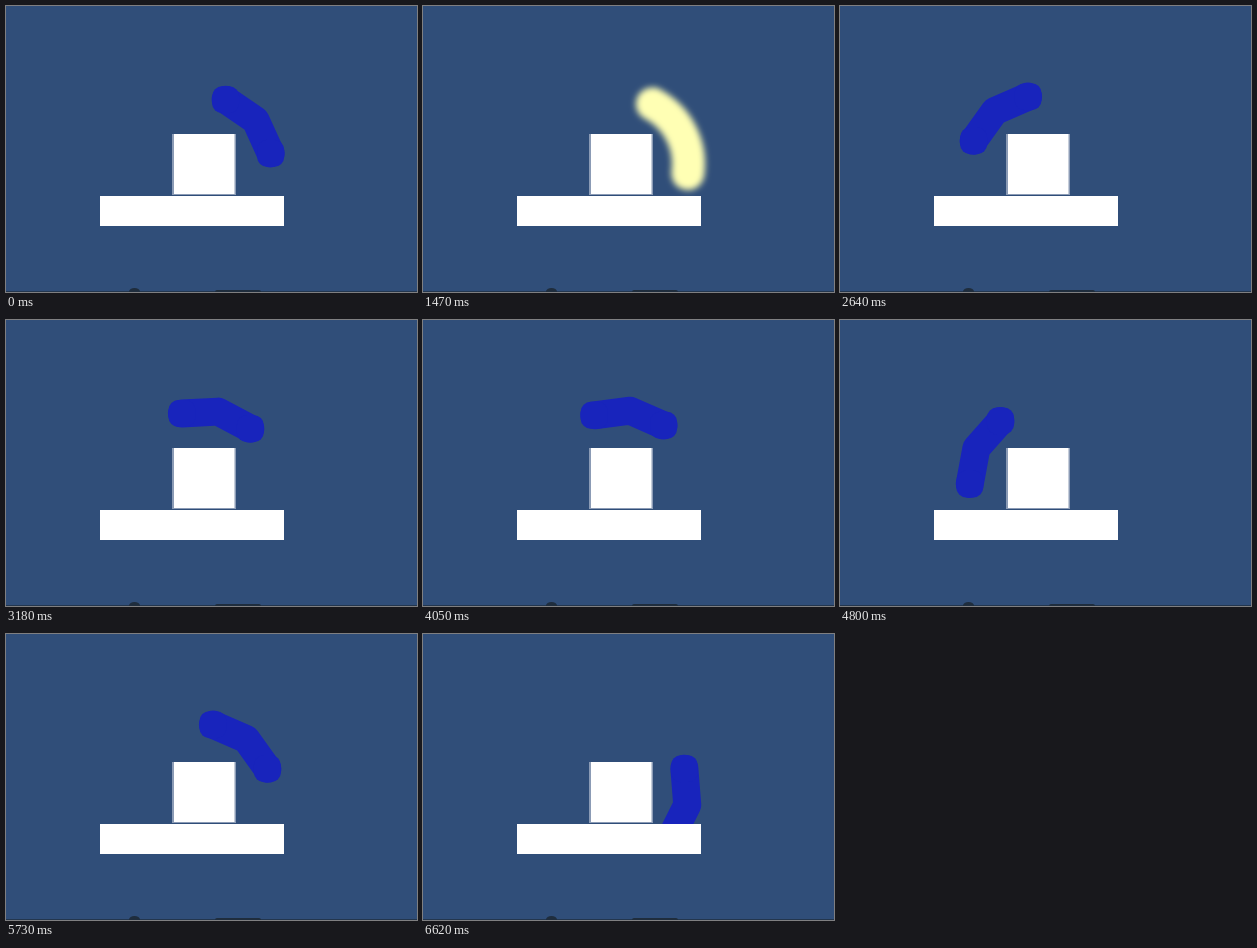
Recreate the animation shown at these times as an HTML page. Size 411 px wide and 286 px high, loop 6690 ms.

```html
<!DOCTYPE html>
<html lang="en">
<head>
<meta charset="utf-8">
<title>Swinging arc</title>
<style>
  html, body { margin: 0; width: 100%; height: 100%; overflow: hidden; background: #304e79; }
  svg { display: block; width: 100vw; height: 100vh; }
</style>
</head>
<body>
<svg viewBox="0 0 411 286">
  <defs>
    <filter id="soft" filterUnits="userSpaceOnUse" x="0" y="0" width="411" height="286">
      <feGaussianBlur stdDeviation="3"/>
    </filter>
  </defs>
  <rect width="411" height="286" fill="#304e79"/>
  <g id="arm" fill="#1824bc">
    <polyline id="bar" fill="none" stroke="#1824bc" stroke-width="28" stroke-linejoin="round" stroke-linecap="round"/>
    <rect id="tipA" width="27" height="27" rx="10"/>
    <rect id="tipB" width="27" height="27" rx="10"/>
  </g>
  <rect x="166" y="128" width="64" height="61" fill="#8b9bb5"/>
  <rect x="168" y="128" width="60.5" height="60" fill="#fff"/>
  <rect x="94" y="190" width="184" height="30" fill="#fff"/>
  <path id="glow" fill="none" stroke="#ffffb4" stroke-width="33" stroke-linecap="round" filter="url(#soft)"/>
  <g fill="#1f2d3d">
    <rect y="285" width="411" height="1" opacity=".7"/>
    <ellipse cx="128.5" cy="285.5" rx="5.5" ry="3.5"/>
    <rect x="209" y="284" width="46" height="4" rx="2"/>
  </g>
</svg>
<script>
const LOOP = 6690, CX = 197.5, CY = 158, R = 68;
const HALF = 31, GLOW_HALF = 35, START = -40;

const linear = x => x;
const easeOut = x => 1 - (1 - x) ** 1.7;
const easeIn = x => x ** 1.2;
const smooth = x => x * x * (3 - 2 * x);

// first change, last change, number of steps, final angle, easing
const moves = [
  [330, 600, 5, -27, easeOut],
  [2020, 2090, 2, -64.5, linear],
  [2160, 2640, 7, -129, easeOut],
  [2710, 3180, 8, -77.5, smooth],
  [4040, 4450, 7, -154, smooth],
  [5440, 5730, 5, -51, easeIn],
  [5800, 6000, 3, -16, easeOut],
  [6410, 6620, 4, 11, linear]
];
const flashes = [
  [1470, 1600], [1730, 1870], [3840, 3970],
  [4530, 4800], [4930, 5060], [6070, 6210]
];

const el = id => document.getElementById(id);
const arm = el('arm'), bar = el('bar'), glow = el('glow');
const tips = [el('tipA'), el('tipB')];

function point(deg) {
  const a = deg * Math.PI / 180;
  return [CX + R * Math.cos(a), CY + R * Math.sin(a)];
}

function angleAt(t) {
  let angle = START;
  for (const [from, to, count, target, ease] of moves) {
    if (t < from) break;
    const gap = (to - from) / (count - 1);
    const step = Math.min(count, Math.floor((t - from) / gap + 1e-6) + 1);
    angle += (target - angle) * ease(step / count);
  }
  return angle;
}

function draw(t) {
  const angle = angleAt(t);
  const lit = flashes.some(([on, off]) => t >= on && t < off);
  arm.style.display = lit ? 'none' : '';
  glow.style.display = lit ? '' : 'none';

  const pts = [-HALF, 0, HALF].map(d => point(angle + d));
  bar.setAttribute('points', pts.join(' '));
  [pts[0], pts[2]].forEach(([x, y], i) => {
    tips[i].setAttribute('x', x - 13.5);
    tips[i].setAttribute('y', y - 13.5);
  });
  glow.setAttribute('d',
    `M${point(angle - GLOW_HALF)}A${R} ${R} 0 0 1 ${point(angle + GLOW_HALF)}`);
}

const begin = performance.now();
function tick() {
  draw((performance.now() - begin) % LOOP);
  requestAnimationFrame(tick);
}
tick();
</script>
</body>
</html>
```
